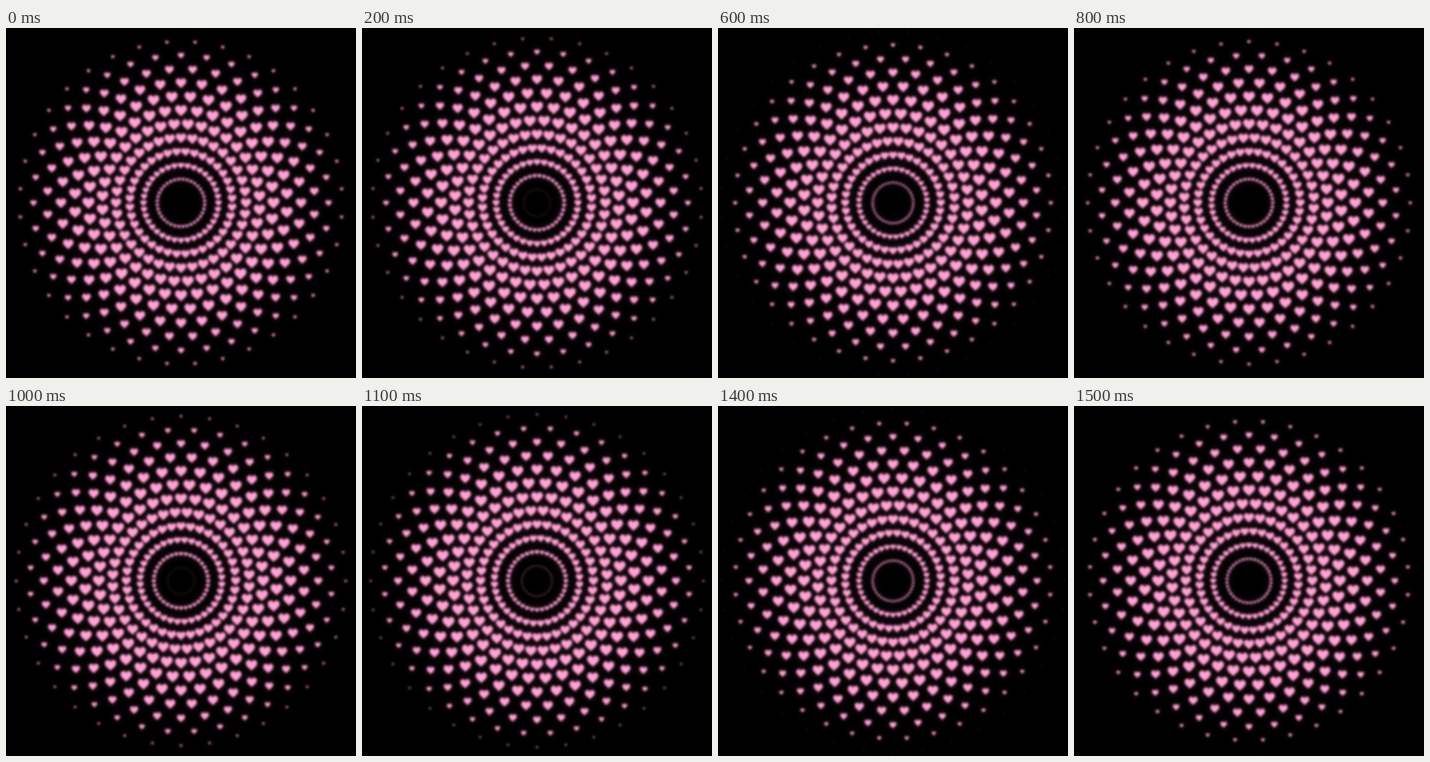
These frames come from a looping animation (350 by 350 pixels, 1.6 s). An HTML page with a canvas:

```html
<!DOCTYPE html>
<html>
<head>
<meta charset="utf-8">
<style>
html, body { margin: 0; width: 100%; height: 100%; overflow: hidden; background: #000; }
canvas { display: block; }
</style>
</head>
<body>
<canvas id="stage" width="350" height="350"></canvas>
<script>
const SIZE = 350, CENTER = SIZE / 2;
const LOOP = 1600, STEP = 100;
const RINGS = 12, HEARTS = 36;
const INNER = 10, OUTER = 175;
const MAX_SIZE = 11.3;
const PINK = '#ffa3d2', GLOW = '#ff6abd';

const ctx = document.getElementById('stage').getContext('2d');
const layer = document.createElement('canvas');
layer.width = layer.height = SIZE;
const layerCtx = layer.getContext('2d');

function addHeart(path, x, y, w) {
  const X = u => x + u * w, Y = v => y + v * w;
  path.moveTo(X(0), Y(0.48));
  path.bezierCurveTo(X(-0.14), Y(0.3), X(-0.5), Y(0.13), X(-0.5), Y(-0.17));
  path.bezierCurveTo(X(-0.5), Y(-0.5), X(-0.1), Y(-0.54), X(0), Y(-0.24));
  path.bezierCurveTo(X(0.1), Y(-0.54), X(0.5), Y(-0.5), X(0.5), Y(-0.17));
  path.bezierCurveTo(X(0.5), Y(0.13), X(0.14), Y(0.3), X(0), Y(0.48));
  path.closePath();
}

function makeRing(index, shift) {
  const life = (index + shift % 1) / RINGS;
  const radius = INNER + (OUTER - INNER) * life;
  const scale = Math.sin(Math.PI * life);
  // Neighbouring rings are staggered by half a heart and keep their stagger as they move out
  const stagger = (index + Math.floor(shift)) % 2 ? 0.5 : 0;
  const path = new Path2D();
  for (let i = 0; i < HEARTS; i++) {
    const angle = (i + stagger) / HEARTS * 2 * Math.PI;
    addHeart(path, CENTER + radius * Math.sin(angle), CENTER - radius * Math.cos(angle), MAX_SIZE * scale);
  }
  return { path, alpha: Math.min(1, scale * 4.5) };
}

function paintHearts(rings, color) {
  layerCtx.clearRect(0, 0, SIZE, SIZE);
  layerCtx.fillStyle = layerCtx.strokeStyle = color;
  layerCtx.lineWidth = 1;
  layerCtx.lineJoin = 'round';
  for (const { path, alpha } of rings) {
    layerCtx.globalAlpha = alpha;
    layerCtx.fill(path);
    layerCtx.globalAlpha = alpha * 0.6;
    layerCtx.stroke(path);
  }
}

function stampLayer(blur, alpha) {
  ctx.filter = `blur(${blur}px)`;
  ctx.globalAlpha = alpha;
  ctx.drawImage(layer, 0, 0);
  ctx.filter = 'none';
  ctx.globalAlpha = 1;
}

function draw(time) {
  const shift = time / (LOOP / 2);
  const rings = Array.from({ length: RINGS }, (_, i) => makeRing(i, shift));
  ctx.fillStyle = '#000';
  ctx.fillRect(0, 0, SIZE, SIZE);
  paintHearts(rings, GLOW);
  stampLayer(3, 0.32);
  paintHearts(rings, PINK);
  stampLayer(0.8, 1);
}

let start = null, shown = -1;
function tick(now) {
  if (start === null) start = now;
  const step = Math.floor((now - start) % LOOP / STEP);
  if (step !== shown) {
    shown = step;
    draw(step * STEP);
  }
  requestAnimationFrame(tick);
}
draw(0);
requestAnimationFrame(tick);
</script>
</body>
</html>
```
